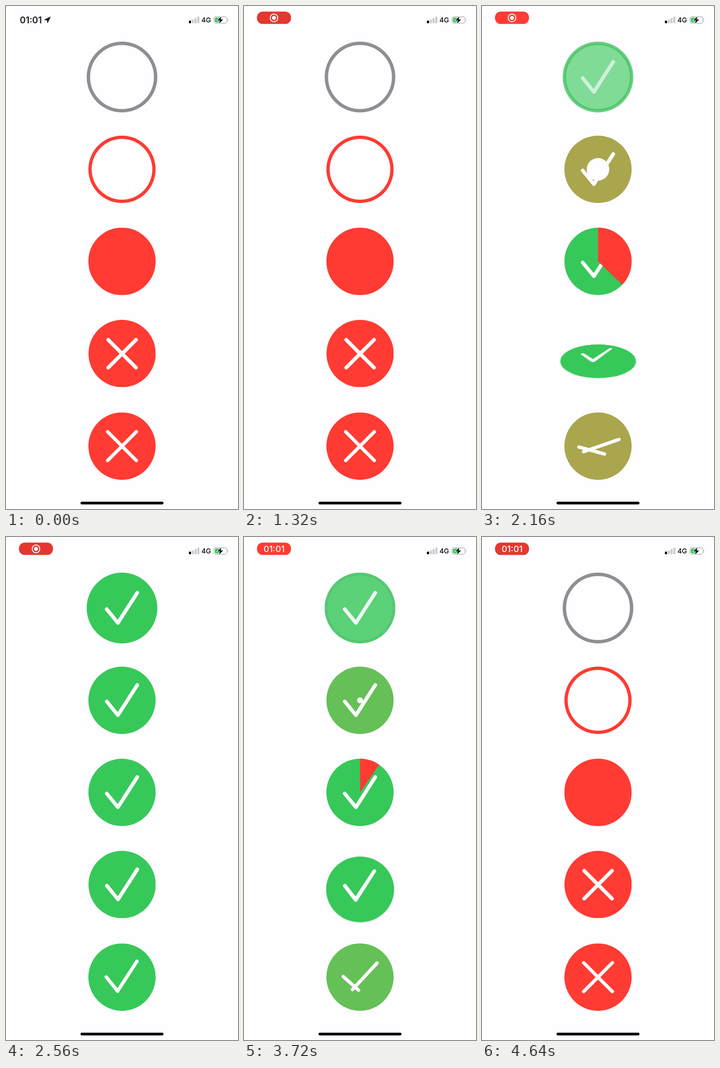
An HTML page that plays this animation: 509 by 1101 pixels, repeating every 4680 ms.

```html
<!DOCTYPE html>
<html lang="en">
<head>
<meta charset="utf-8">
<title>Checkbox transitions</title>
<style>
  html, body { margin: 0; width: 100%; height: 100%; overflow: hidden; background: #fefdff; }
  .stage { position: absolute; left: 0; top: 0; width: 509px; height: 1101px; }
  .flip { position: absolute; left: 180.75px; top: 686.75px; width: 147.5px; height: 147.5px; perspective: 147.5px; }
  .face { position: absolute; left: 0; top: 0; width: 100%; height: 100%; backface-visibility: hidden; }
  text { font-family: Inter, Roboto, sans-serif; }
  .line { fill: none; stroke: #fefdff; stroke-width: 8; stroke-linecap: round; stroke-linejoin: round; }
  .thin { stroke-width: 7.4; }
  .red { fill: #ff3b33; }
  .green { fill: #37c85a; }
</style>
</head>
<body>
<svg class="stage" viewBox="0 0 509 1101">
  <defs>
    <path id="check" d="M-33.5 2.5L-9 32.5L33.5 -33.5"/>
  </defs>

  <g id="clock">
    <text x="54.5" y="37.6" font-size="19.5" font-weight="600" text-anchor="middle" fill="#1c1c1e">01:01</text>
    <path d="M97 24L85 30.2L90.6 30.9L91.2 36.6Z" fill="#1c1c1e" stroke="#1c1c1e" stroke-width="1.4" stroke-linejoin="round"/>
  </g>
  <g id="pill">
    <rect id="pillBox" x="28.5" y="12.3" width="74.6" height="27" rx="12.5"/>
    <g id="record">
      <circle cx="65.8" cy="26" r="8.4" fill="none" stroke="#fff" stroke-width="2"/>
      <circle cx="65.8" cy="26" r="4.4" fill="#fff"/>
    </g>
    <text id="pillTime" x="66" y="32.6" font-size="19" font-weight="500" text-anchor="middle" fill="#fff">01:01</text>
  </g>

  <rect x="401.3" y="32" width="4.6" height="5.7" rx="1.2"/>
  <g fill="#cbcacd">
    <rect x="407.5" y="29.6" width="4.6" height="8.1" rx="1.2"/>
    <rect x="413.6" y="26.6" width="4.6" height="11.1" rx="1.2"/>
    <rect x="419.7" y="23.2" width="4.6" height="14.5" rx="1.2"/>
  </g>
  <text x="439.3" y="36" font-size="15" font-weight="500" text-anchor="middle">4G</text>
  <rect x="456.3" y="23.6" width="28.6" height="14" rx="4.2" fill="none" stroke="#a3a2a6" stroke-width="1.2"/>
  <path d="M486.4 28.4Q488.6 30.5 486.4 32.8Z" fill="#a3a2a6"/>
  <rect x="458.2" y="25.5" width="12.4" height="10.2" rx="2.4" class="green"/>
  <path d="M472.6 22.8L463.8 31.6H469.2L467.4 38.4L476.4 29.4H470.8Z" stroke="#fefdff" stroke-width="2" paint-order="stroke"/>

  <g transform="translate(254.5 155.5)">
    <circle id="grayRing" r="73.75" fill="none" stroke="#8e8e93" stroke-width="7.5"/>
    <circle id="greenRing" r="73.75" fill="none" stroke="#37c85a" stroke-width="7.5"/>
    <circle id="fadeFill" class="green"/>
    <use id="fadeCheck" href="#check" class="line"/>
  </g>

  <g transform="translate(254.5 357.5)">
    <circle id="holeDisk" r="73.75"/>
    <use href="#check" class="line"/>
    <circle id="hole" fill="#fefdff"/>
  </g>

  <g transform="translate(254.5 559)">
    <g id="pieBase">
      <circle r="73.75" class="green"/>
      <use href="#check" class="line"/>
    </g>
    <circle id="pie" r="36.875" fill="none" stroke="#ff3b33" stroke-width="73.75" pathLength="1" transform="rotate(-90)"/>
  </g>

  <g transform="translate(254.5 963.4)">
    <circle id="morphDisk" r="73.75"/>
    <path id="shortBar" class="line thin"/>
    <path id="longBar" class="line thin"/>
  </g>

  <rect x="163.5" y="1085" width="182" height="6" rx="3"/>
</svg>

<div class="flip">
  <svg id="front" class="face" viewBox="-73.75 -73.75 147.5 147.5">
    <circle r="73.75" class="red"/>
    <path class="line" d="M-30.5 -30.2L30.5 30.8M30.5 -30.2L-30.5 30.8"/>
  </svg>
  <svg id="back" class="face" viewBox="-73.75 -73.75 147.5 147.5">
    <circle r="73.75" class="green"/>
    <use href="#check" class="line"/>
  </svg>
</div>

<script>
const LOOP = 4680, SPAN = 700, TURN_ON = 1758, TURN_OFF = 3569;
const RED = [255, 59, 51], GREEN = [55, 200, 90];
const el = id => document.getElementById(id);
const set = (id, attrs) => {
  for (const k in attrs) el(id).setAttribute(k, attrs[k]);
};
const fade = (id, v) => set(id, { opacity: v });
const clamp = v => Math.min(1, Math.max(0, v));
const mix = (a, b, p) => a + (b - a) * p;

// cubic-bezier(.42, 0, .58, 1)
function ease(x) {
  if (x <= 0 || x >= 1) return clamp(x);
  let lo = 0, hi = 1, s = 0.5;
  for (let i = 0; i < 24; i++) {
    s = (lo + hi) / 2;
    const r = 1 - s;
    if (3 * r * r * s * 0.42 + 3 * r * s * s * 0.58 + s ** 3 < x) lo = s; else hi = s;
  }
  return s * s * (3 - 2 * s);
}

// blend in linear light
const toLinear = v => (v /= 255) <= 0.04045 ? v / 12.92 : ((v + 0.055) / 1.055) ** 2.4;
const toSrgb = v => 255 * (v <= 0.0031308 ? v * 12.92 : 1.055 * v ** (1 / 2.4) - 0.055);
const tint = p => `rgb(${RED.map((c, i) => Math.round(toSrgb(mix(toLinear(c), toLinear(GREEN[i]), p))))})`;

// bars are [centre x, centre y, length, angle]
function bar(id, from, to, p) {
  const [x, y, len, deg] = from.map((v, i) => mix(v, to[i], p));
  const a = deg * Math.PI / 180, dx = Math.cos(a) * len / 2, dy = Math.sin(a) * len / 2;
  set(id, { d: `M${x - dx} ${y - dy}L${x + dx} ${y + dy}` });
}

function drawPill(t) {
  const shown = clamp((t - 120) / 300), timed = clamp((t - 2980) / 250);
  const dim = clamp(0.5 + 1.4 * Math.cos((t - 1130) / 1650 * 2 * Math.PI));
  fade('clock', 1 - shown);
  fade('pill', shown);
  fade('record', 1 - timed);
  fade('pillTime', timed);
  set('pillBox', { fill: `rgb(${mix(255, 228, dim)},${mix(59, 55, dim)},${mix(51, 48, dim)})` });
}

function draw(t) {
  const off = t >= TURN_OFF;
  const p = off ? 1 - ease((t - TURN_OFF) / SPAN) : ease((t - TURN_ON) / SPAN);
  const cover = off ? p * p : p;

  drawPill(t);

  fade('grayRing', off ? 1 - 0.7 * p : 1 - p);
  fade('greenRing', cover);
  set('fadeFill', { r: off ? 70.1 : 73.75, opacity: cover });
  fade('fadeCheck', p);

  set('holeDisk', { fill: tint(p) });
  set('hole', { r: 66.5 * (1 - p) });

  fade('pieBase', p > 0 ? 1 : 0);
  set('pie', { 'stroke-dasharray': `${1 - p} 2`, opacity: p < 1 ? 1 : 0 });

  el('front').style.transform = `rotateX(${-180 * p}deg)`;
  el('back').style.transform = `rotateX(${180 * (1 - p)}deg)`;

  set('morphDisk', { fill: tint(p) });
  bar('shortBar', [0, 0, 89, -45], [-22, 15.2, 40, 51], p);
  bar('longBar', [0, 0, 89, 45], [11.5, -2, 78, -57], p);
}

const start = performance.now();
function tick() {
  draw((performance.now() - start) % LOOP);
  requestAnimationFrame(tick);
}
tick();
</script>
</body>
</html>
```
